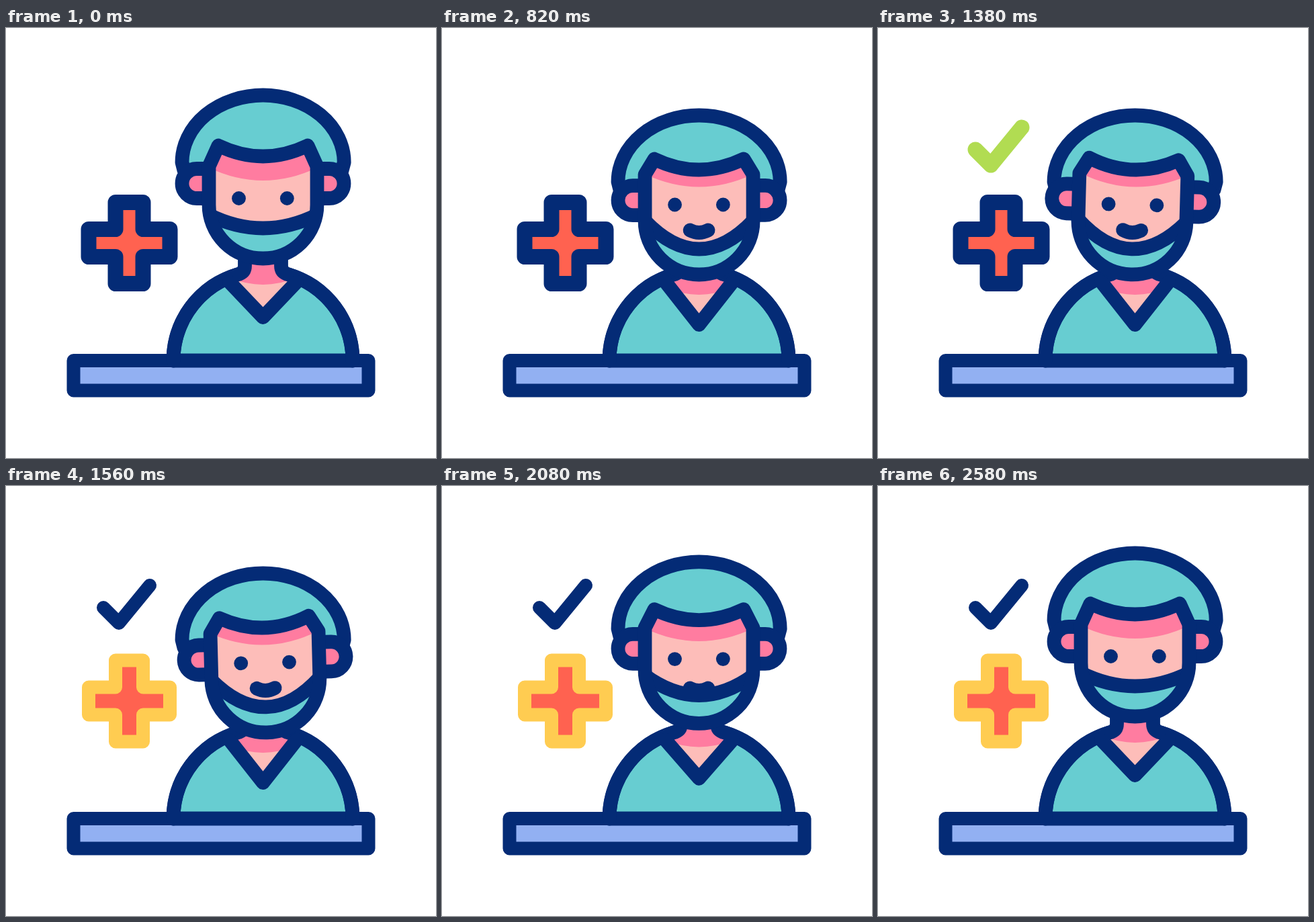
Animation of 640 by 640 pixels, one loop 2.8 s. Source, as an HTML page:

```html
<!DOCTYPE html>
<html lang="en">
<head>
<meta charset="utf-8">
<title>Surgeon</title>
<style>
  html, body { margin: 0; width: 100%; height: 100%; overflow: hidden; background: #fff; }
  svg { display: block; width: 100%; height: 100%; }
  .line { stroke: #042b76; stroke-width: 20.8; stroke-linecap: round; stroke-linejoin: round; fill: none; }
  .teal { fill: #67cdd1; }
  .skin { fill: #fdbdb9; }
  .pink { fill: #ff7ca0; }
  .navy { fill: #042b76; }
  .desk { fill: #92b0f2; stroke-width: 20; }
  #cross { fill: #ff6250; }
  #band { stroke-linecap: butt; }
</style>
</head>
<body>
<svg viewBox="0 0 640 640">
  <defs><clipPath id="neckClip"><path id="neckArea"/></clipPath></defs>

  <rect class="line desk" x="100.5" y="495" width="439" height="44.5"/>
  <path class="line teal" d="M249 495A133.5 133.5 0 0 1 516 495Z"/>
  <path id="neck" class="skin"/>
  <path id="neckShade" class="pink" clip-path="url(#neckClip)"/>
  <path class="line" d="M249 495A133.5 133.5 0 0 1 347 366.3Q355.5 363 355.5 354V340"/>
  <path class="line" d="M516 495A133.5 133.5 0 0 0 418 366.3Q409.5 363 409.5 354V340"/>
  <path id="collar" class="line"/>

  <path id="domeFill" class="teal"/>
  <path id="dome" class="line"/>
  <g id="head">
    <path id="earL" class="line pink"/>
    <path id="earR" class="line pink"/>
    <path id="face" class="skin"/>
    <path id="shade" class="pink"/>
    <circle id="eyeL" class="navy" cx="346.5" r="10.4"/>
    <circle id="eyeR" class="navy" cx="418.3" r="10.4"/>
    <path class="line" d="M369 301Q382.5 308 396 301"/>
    <path id="mask" class="teal"/>
    <path id="band" class="line"/>
    <path id="outline" class="line"/>
  </g>

  <path id="cross" class="line"
    d="M163 259.5H204V299.5H244V340.5H204V380.5H163V340.5H123V299.5H163Z"/>
  <path id="check" class="line" d="M145 181L168 204L214 148"/>
</svg>
<script>
const LOOP = 2800, BLINK = 280;
const SWING = [[800, 0], [1070, -1.78], [1340, 1.78], [1610, -1.78], [1880, 0]];
const POP = [[900, 0], [1070, 1.43], [1180, 1]];

const el = {};
document.querySelectorAll('[id]').forEach(n => el[n.id] = n);
const path = (id, d) => el[id].setAttribute('d', d);
for (const id of ['earL', 'earR']) el[id].style.fill = '#ff7ca0';

const clamp = x => Math.min(1, Math.max(0, x));
const smooth = x => x * x * (3 - 2 * x);
const ramp = (t, a, b) => smooth(clamp((t - a) / (b - a)) ** 0.85);

// eased value from a list of [time, value]
function track(keys, t) {
  if (t <= keys[0][0]) return keys[0][1];
  for (let i = 1; i < keys.length; i++) {
    const [a, u] = keys[i - 1], [b, v] = keys[i];
    if (t < b) return u + (v - u) * smooth((t - a) / (b - a));
  }
  return keys[keys.length - 1][1];
}

// p = 0: upright with mask on, p = 1: lowered with mouth visible
function drawPose(p) {
  const mix = (a, b) => a + (b - a) * p;

  const tip = mix(430.5, 441.5);
  const neck = `M333 378L338 372L355 364V338H410V364L427 372L432 378L382.5 ${tip}Z`;
  path('neck', neck);
  path('neckArea', neck);
  const ny = mix(370, 385);
  path('neckShade', `M328 335H437V${ny}Q382.5 ${ny + 24} 328 ${ny}Z`);
  path('collar', `M332.5 378L382.5 ${tip}L432.5 378`);

  const side = mix(200, 229), ry = side - mix(100, 130);
  const peak = mix(175, 195), temple = mix(206, 218), ear = mix(231.5, 256.5);
  const arc = `M262 ${side}A120.6 ${ry} 0 0 1 503.2 ${side}`;
  path('dome', `M265 ${side + 12}L${arc.slice(1)}L500 ${side + 12}`);
  path('domeFill', `${arc}V${ear - 16}H463V${temple}L449 ${peak}` +
    `Q382.5 ${peak + 32} 316 ${peak}L302 ${temple}V${ear - 16}H262Z`);

  path('earL', `M302 ${ear - 22}H284A22 22 0 0 0 284 ${ear + 22}H302`);
  path('earR', `M463 ${ear - 22}H481A22 22 0 0 1 481 ${ear + 22}H463`);

  const jaw = mix(263, 287);
  const hair = `L449 ${peak}Q382.5 ${peak + 32} 316 ${peak}`;
  const chin = `A80.5 80 0 0 0 463 ${jaw}`;
  const face = `M302 ${temple}V${jaw}${chin}V${temple}${hair}Z`;
  path('face', face);
  path('outline', face);
  const sy = mix(208, 217.5);
  path('shade', `M302 ${sy}Q382.5 ${sy + 38} 463 ${sy}V${temple}${hair}L302 ${temple}Z`);

  const by = mix(278, 287), bc = mix(318, 371);
  const band = `Q382.5 ${bc} 302 ${by}`;
  path('band', `M463 ${by}${band}`);
  path('mask', `M463 ${by}${band}V${jaw}${chin}Z`);

  const eye = mix(253.5, 263);
  el.eyeL.setAttribute('cy', eye);
  el.eyeR.setAttribute('cy', eye);
}

function drawSigns(t) {
  const lit = t >= 1180 && Math.floor((t - 1180) / BLINK) % 2 === 1;
  const width = lit ? 20 : 23;
  el.cross.style.stroke = lit ? '#ffcc51' : '#042b76';
  el.check.style.stroke = lit ? '#042b76' : '#b1dc52';
  el.cross.style.strokeWidth = el.check.style.strokeWidth = width;
  const s = track(POP, t);
  el.check.style.display = s > 0 ? '' : 'none';
  el.check.setAttribute('transform', `translate(179.5 176) scale(${s}) translate(-179.5 -176)`);
}

function draw(t) {
  drawPose(ramp(t, 0, 480) - ramp(t, 1880, 2290));
  el.head.setAttribute('transform', `rotate(${track(SWING, t)} 382.5 138)`);
  drawSigns(t);
}

const start = performance.now();
function tick() {
  draw((performance.now() - start) % LOOP);
  requestAnimationFrame(tick);
}
draw(0);
requestAnimationFrame(tick);
</script>
</body>
</html>
```
